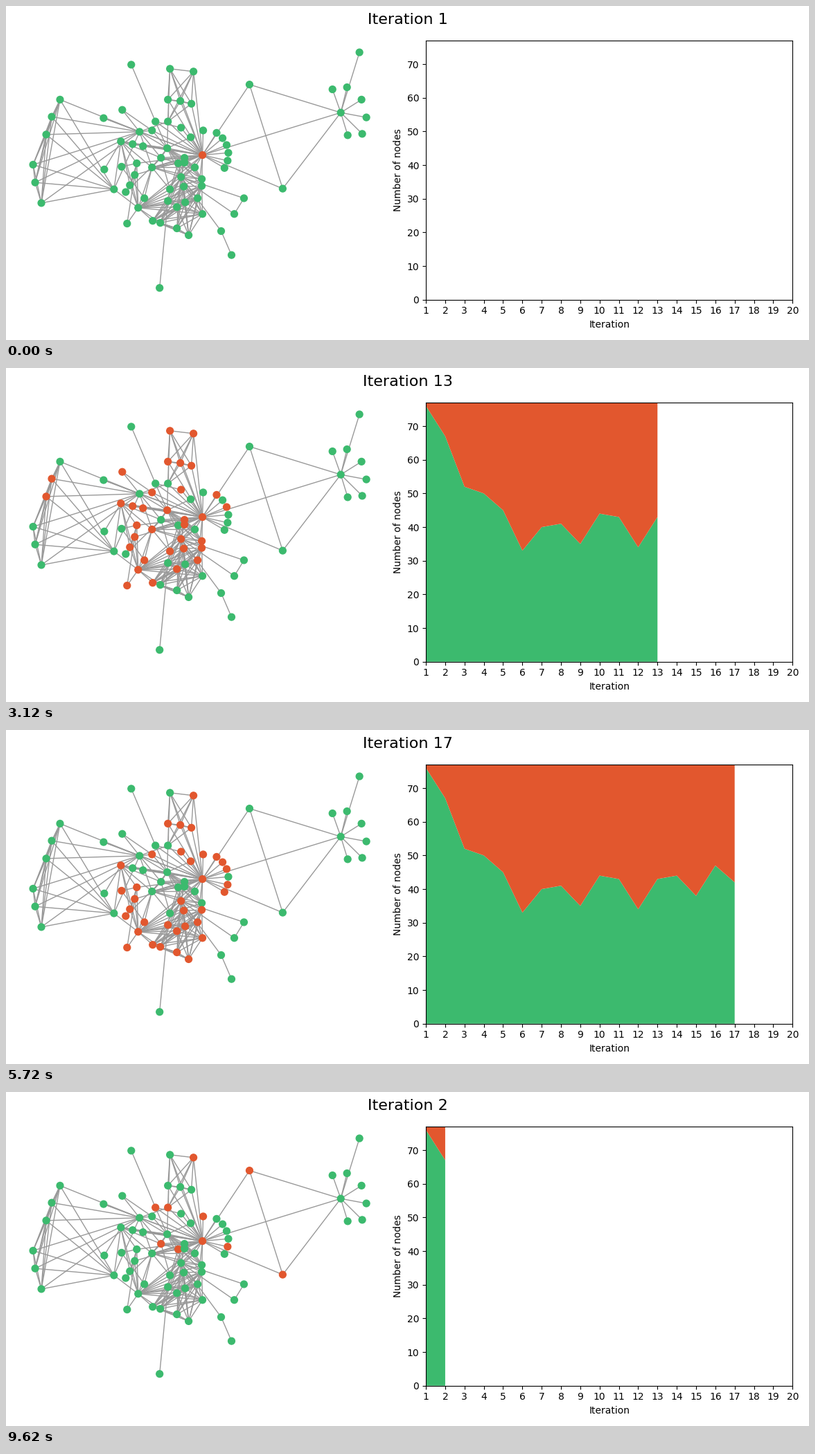
A matplotlib script for the animation above (9880 ms loop, 1159x483 px).

```python
from itertools import combinations

import numpy as np
import matplotlib.pyplot as plt
from matplotlib.animation import FuncAnimation
from matplotlib.collections import LineCollection

W, H, DPI = 1159, 483, 100
GREEN, RED, GREY = "#3cba6e", "#e2572e", "#999999"
ROUNDS = 20
HEALTHY = [76, 67, 52, 50, 45, 33, 40, 41, 35, 44, 43, 34, 43, 44, 38, 47, 42,
           39, 43, 41]

points, peaks = [], []
edges = set()


def group(peak, *pts):
    """Add nodes of one community; peak is when the infection is worst there."""
    start = len(points)
    points.extend(pts)
    peaks.extend([peak] * len(pts))
    return range(start, len(points))


def arc(cx, cy, r, first, last, n):
    angles = np.radians(np.linspace(first, last, n))
    return [(cx + r * np.cos(a), cy + r * np.sin(a)) for a in angles]


def link(a, *others):
    for b in others:
        edges.add((min(a, b), max(a, b)))


def clique(*nodes):
    edges.update(combinations(sorted(nodes), 2))


# Communities, placed in stage pixels
hub, = group(10, (284, 215))
west = group(8, (78, 134), (66, 159), (58, 185), (39, 229), (42, 255),
             (51, 285))
gate, door = group(8, (193, 181), (156, 265))
north = group(13, (237, 89), (271, 93), (234, 134), (252, 136), (268, 140))
stem, = group(10, (234, 166))
tip, *bridge = group(30, (484, 153), (352, 112), (400, 264))
leaves = group(30, (511, 65), (472, 119), (493, 116), (514, 134), (521, 160),
               (515, 184), (494, 186))
crown = group(15, (253, 175), (267, 189), (285, 179))
ring = group(15, *arc(284, 214, 37.5, -57, 32, 6))
guard, friar, monk = group(10, (233, 205), (216, 166), (181, 83))
nun, novice, maid = group(15, (211, 179), (168, 149), (141, 161))
ward, *helpers = group(13, (166, 195), (183, 199), (198, 202))
aunt, uncle, cousin = group(13, (189, 227), (186, 244), (179, 259))
niece, guest, nurse = group(17, (167, 232), (142, 236), (173, 269))
colonel, baron, heir = group(13, (200, 278), (175, 315), (191, 292))
wife, boss = group(8, (224, 219), (211, 233))
thieves = group(8, (249, 227), (258, 219), (258, 226), (273, 233))
girl, crook = group(12, (237, 265), (283, 250))
boy, old = group(17, (253, 247), (234, 282))
rebels = group(17, (212, 311), (223, 314), (247, 322), (264, 332), (284, 301),
               (277, 278), (247, 291), (259, 284), (257, 261), (283, 260))
kids = group(8, (344, 278), (330, 301))
near, far, lone = group(8, (311, 326), (326, 361), (222, 409))

chief = rebels[-1]
inner = [*rebels[:2], *rebels[4:]]
band = [boss, *thieves, girl]

link(hub, gate, stem, tip, guard, friar, nun, maid, ward, aunt, uncle, heir,
     wife, boss, boy, chief, rebels[5])
link(hub, *north, *bridge, *crown, *ring, *helpers, *thieves)
clique(*west, gate, door)
link(gate, stem, guard, nun, novice, maid, wife, boss)
link(door, ward, heir)
clique(*north, stem)
link(tip, *bridge, *leaves)
clique(*bridge)
link(guard, stem, crown[1], friar, nun, ward, *helpers, wife, boss, *thieves,
     boy, chief)
link(friar, crown[0], monk)
link(nun, novice)
link(ward, *helpers, aunt, cousin, heir, wife, boss, guest)
clique(aunt, uncle, cousin, heir)
link(niece, aunt, colonel)
link(nurse, uncle, wife)
link(colonel, heir, boss)
link(baron, uncle, heir)
clique(*band)
link(wife, boss, girl, *thieves[:2])
link(crook, *band, boy)
link(heir, boss, girl, boy, old, *inner)
clique(*rebels)
link(boy, boss, *thieves, old, *rebels, *kids, near)
link(old, girl, *inner, lone)
clique(*kids)
link(near, far)

pos = np.array(points)
N = len(pos)


def spread():
    """Contagion along the links, keeping the healthy count of each round."""
    rng = np.random.default_rng(4)
    linked = np.zeros((N, N))
    for a, b in edges:
        linked[a, b] = linked[b, a] = 1
    sick = np.arange(N) == hub
    states = [sick]
    for it in range(2, ROUNDS + 1):
        pressure = linked @ sick
        season = np.exp(-((it - np.array(peaks)) / 4) ** 2)
        score = season + 0.5 * np.log1p(pressure) + rng.random(N)
        score[(pressure == 0) & ~sick] = -1
        score[hub] = np.inf
        worst = np.argsort(-score)[:N - HEALTHY[it - 1]]
        sick = np.isin(np.arange(N), worst)
        states.append(sick)
    return states


states = spread()

fig, (net, chart) = plt.subplots(1, 2, figsize=(W / DPI, H / DPI), dpi=DPI,
                                 facecolor="white")
title = fig.suptitle("Iteration 1", fontsize=16)

net.margins(0.05)
dots = net.scatter(*pos.T, s=50, linewidths=1, zorder=2)
net.add_collection(LineCollection([pos[list(e)] for e in sorted(edges)],
                                  colors=GREY, linewidths=1, zorder=1),
                   autolim=False)
net.invert_yaxis()
net.axis("off")

low, = chart.fill([1], [0], color=GREEN, lw=0)
high, = chart.fill([1], [0], color=RED, lw=0)
chart.set(xlim=(1, ROUNDS), ylim=(0, N), xlabel="Iteration",
          ylabel="Number of nodes", xticks=range(1, ROUNDS + 1))
fig.tight_layout()


def draw(frame):
    it = frame + 1 if frame < ROUNDS else 2 * ROUNDS - 1 - frame
    title.set_text(f"Iteration {it}")
    dots.set_color(np.where(states[it - 1], RED, GREEN))
    curve = [(i + 1, HEALTHY[i]) for i in range(it)]
    for area, base in ((low, 0), (high, N)):
        area.set_xy([(1, base), *curve, (it, base)])
        area.set_visible(it > 1)
    return title, dots, low, high


anim = FuncAnimation(fig, draw, frames=2 * ROUNDS - 2, interval=260,
                     repeat=True, repeat_delay=0, blit=False)
plt.show()
```
